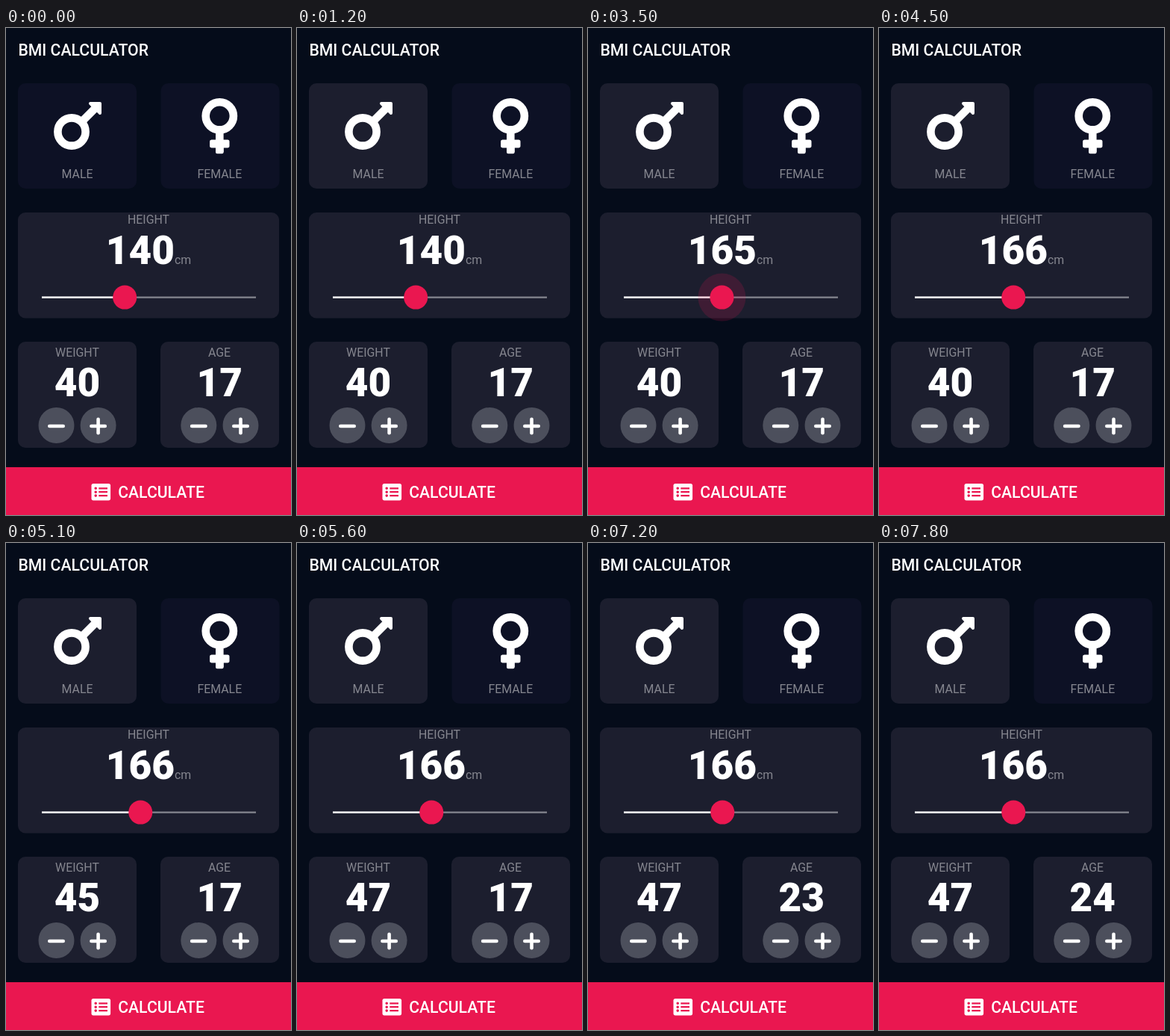
Recreate the animation shown at these times as an HTML page. Size 382 px wide and 652 px high, loop 8 s.

```html
<!DOCTYPE html>
<html lang="en">
<head>
<meta charset="utf-8">
<title>BMI calculator</title>
<style>
html, body { margin: 0; width: 100%; height: 100%; overflow: hidden; background: #050c1a; }
svg { display: block; }
text { font: 15.9px Roboto, sans-serif; fill: #85868f; }
.mid { text-anchor: middle; }
.head { font-size: 21.2px; font-weight: 500; fill: #fff; }
.num { font-size: 53px; font-weight: 900; fill: #fff; }
.card { fill: #1c1e2e; }
.off { fill: #0d1125; }
.icon { fill: #fff; stroke: #fff; }
</style>
</head>
<body>
<svg width="382" height="652" viewBox="0 0 382 652">
  <defs>
    <g id="minus">
      <circle r="24" fill="#4c4f5c"/>
      <path d="M-9.2 1H9.2" stroke="#fff" stroke-width="4.6" stroke-linecap="round"/>
    </g>
    <g id="plus">
      <use href="#minus"/>
      <path d="M0-8.2V10.2" stroke="#fff" stroke-width="4.6" stroke-linecap="round"/>
    </g>
  </defs>
  <rect width="382" height="652" fill="#050c1a"/>
  <text class="head" x="16.4" y="36.6">BMI CALCULATOR</text>

  <rect id="male" class="card" x="16" y="74" width="159" height="141" rx="10"/>
  <rect class="card off" x="207.5" y="74" width="159" height="141" rx="10"/>
  <g class="icon">
    <circle cx="88" cy="139" r="18.6" fill="none" stroke-width="10.6"/>
    <path d="M102 125L119 108" stroke-width="10.6"/>
    <path d="M113 101H126V114Z" stroke-width="4" stroke-linejoin="round"/>
    <circle cx="286.3" cy="117.8" r="18.6" fill="none" stroke-width="10.6"/>
    <path d="M286.3 138V166.3M275 155H297.6" stroke-width="10.6"/>
    <path d="M275.1 151.7H297.5V158.3H275.1ZM283 158H289.6V166.3H283Z" stroke-width="4" stroke-linejoin="round"/>
  </g>
  <text class="mid" x="95.5" y="201">MALE</text>
  <text class="mid" x="286.3" y="201">FEMALE</text>

  <rect class="card" x="16" y="247" width="350" height="141.5" rx="10"/>
  <text class="mid" x="191" y="262.3">HEIGHT</text>
  <text class="mid" x="191" y="315.6"><tspan id="height" class="num">140</tspan><tspan>cm</tspan></text>
  <path d="M48 360.6H335" stroke="#85868f" stroke-width="2.1"/>
  <path id="track" stroke="#fff" stroke-width="2.1"/>
  <g id="thumb" fill="#ea1750">
    <circle id="halo" opacity=".16"/>
    <circle r="16"/>
  </g>

  <rect class="card" x="16" y="420" width="159" height="142" rx="10"/>
  <rect class="card" x="207" y="420" width="159" height="142" rx="10"/>
  <text class="mid" x="95.5" y="440.2">WEIGHT</text>
  <text class="mid" x="286" y="440.2">AGE</text>
  <text id="weight" class="mid num" x="95.5" y="493.3">40</text>
  <text id="age" class="mid num" x="286.3" y="493.3">17</text>
  <use href="#minus" x="67.5" y="532"/>
  <use href="#plus" x="123.6" y="532"/>
  <use href="#minus" x="258.3" y="532"/>
  <use href="#plus" x="314.5" y="532"/>

  <rect y="588" width="382" height="64" fill="#ea1750"/>
  <rect x="114.5" y="610" width="25.6" height="22.4" rx="2.6" fill="#fff"/>
  <path d="M120.2 616.3h.01M120.2 621.2h.01M120.2 626.1h.01" stroke="#ea1750" stroke-width="3.6" stroke-linecap="round"/>
  <path d="M124.3 616.3H136M124.3 621.2H136M124.3 626.1H136" stroke="#ea1750" stroke-width="2.3"/>
  <text class="head" x="150.2" y="628.6">CALCULATE</text>
</svg>
<script>
const $ = id => document.getElementById(id);
const clamp = x => Math.max(0, Math.min(1, x));
const passed = (times, t) => times.filter(at => t >= at).length;

// Moments when each plus button is pressed
const weightTaps = [4600, 4700, 4900, 5000, 5100, 5300, 5400];
const ageTaps = [5800, 5900, 6100, 6300, 6700, 7200, 7600];

function draw(now) {
  const t = now % 8000, step = Math.floor(t / 100) * 100;
  const height = Math.round(140 + 24 * clamp((step - 2700) / 400)) + passed([3500, 3600], t);
  const x = 159.2 + (height - 140) * .81;
  const halo = clamp((step - 2600) / 100) * clamp((4100 - step) / 200);

  $('male').classList.toggle('off', t < 900);
  $('height').textContent = height;
  $('track').setAttribute('d', `M48 360.6H${x}`);
  $('thumb').setAttribute('transform', `translate(${x} 360.6)`);
  $('halo').setAttribute('r', 32 * halo);
  $('weight').textContent = 40 + passed(weightTaps, t);
  $('age').textContent = 17 + passed(ageTaps, t);
  requestAnimationFrame(() => draw(performance.now() - start));
}
const start = performance.now();
draw(0);
</script>
</body>
</html>
```
